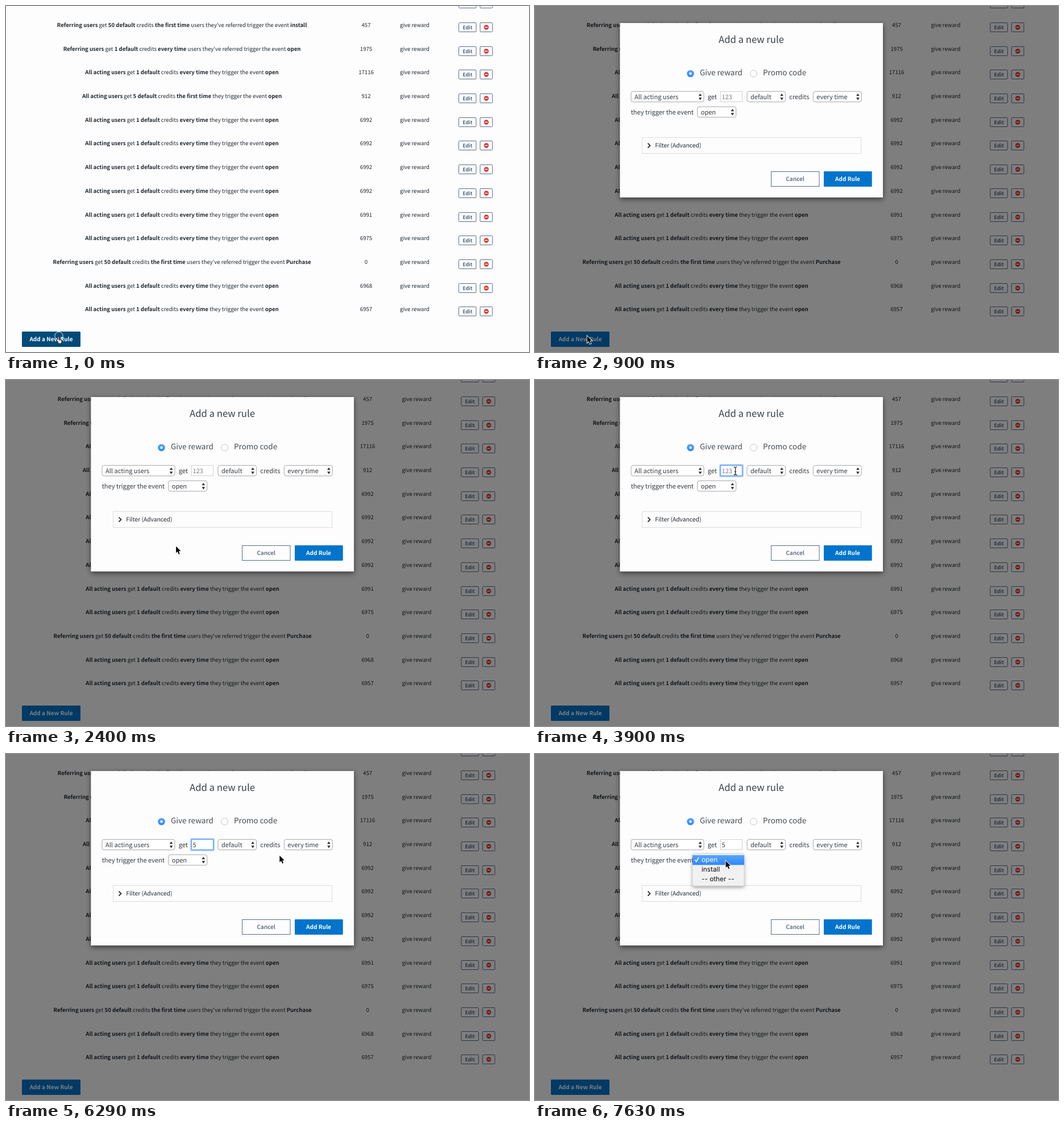
An HTML page for the animation above (8000 ms loop, 920x609 px).

```html
<!DOCTYPE html>
<html lang="en">
<head>
<meta charset="utf-8">
<title>Reward rules</title>
<style>
  html, body { margin: 0; width: 100%; height: 100%; overflow: hidden; background: #fdfdfd; }
  svg { display: block; width: 920px; height: 609px; }
  text {
    font-family: "Noto Sans CJK JP", "Noto Sans CJK SC", "Noto Sans CJK", "Open Sans", sans-serif;
    text-rendering: geometricPrecision; white-space: pre;
  }
  .b { font-weight: 700; }
  .mid { text-anchor: middle; }
  .cell { font-size: 9.6px; fill: #20272f; }
  .edit { font-size: 8.7px; fill: #53657f; }
  .form { font-size: 11.05px; fill: #343a41; }
  .radio { font-size: 13.5px; font-weight: 300; fill: #444a50; }
  .menu { font: 11.8px Inter, "Liberation Sans", sans-serif; fill: #111; }
  .outline { fill: #fdfdfd; stroke: #5a6c8a; }
</style>
</head>
<body>
<svg viewBox="0 0 920 609" xmlns="http://www.w3.org/2000/svg">
  <defs>
    <filter id="modalShadow" x="-10%" y="-10%" width="120%" height="125%">
      <feDropShadow dx="0" dy="3" stdDeviation="5" flood-opacity=".55"/>
    </filter>
    <filter id="menuShadow" x="-20%" y="-20%" width="140%" height="150%">
      <feDropShadow dx="0" dy="3" stdDeviation="3" flood-opacity=".35"/>
    </filter>
    <linearGradient id="blue" x2="0" y2="1">
      <stop stop-color="#56a5fb"/><stop offset="1" stop-color="#2f88f8"/>
    </linearGradient>
  </defs>
  <rect width="920" height="609" fill="#fdfdfd"/>
  <g id="table"></g>
  <rect id="addButton" x="28" y="573" width="103" height="27" rx="1.5"/>
  <text class="b mid" x="79.5" y="590" font-size="10.03" fill="#fff">Add a New Rule</text>

  <g id="dialog">
    <rect width="920" height="609" opacity=".5"/>
    <rect x="149.5" y="30" width="462.5" height="307" fill="#fdfdfd" filter="url(#modalShadow)"/>
    <text class="mid" x="380.5" y="65" font-size="16.7" fill="#3a4047">Add a new rule</text>
    <circle cx="273.5" cy="119" r="6.3" fill="url(#blue)"/>
    <circle cx="273.5" cy="119" r="2.2" fill="#fff"/>
    <text class="radio" x="290" y="122">Give reward</text>
    <circle cx="384.6" cy="119" r="6" fill="#fff" stroke="#c4c4c4"/>
    <text class="radio" x="401" y="122">Promo code</text>
    <g id="selects"></g>
    <text class="form" x="303.7" y="163.5">get</text>
    <text class="form" x="447.3" y="163.5">credits</text>
    <text class="form" x="168.7" y="190.5">they trigger the event</text>

    <rect x="326.5" y="150.5" width="38" height="18" fill="#fff" stroke="#d0d0d0"/>
    <g id="focus" fill="none">
      <rect x="325" y="149" width="41" height="21" rx="2" stroke="#a9cffa" stroke-width="2"/>
      <rect x="326.5" y="150.5" width="38" height="18" stroke="#5b9fee" stroke-width="1.2"/>
    </g>
    <text id="amount" x="328.6" y="163.5" font-size="10.9"></text>
    <rect id="caret" y="151.5" width="1" height="15.5" fill="#111"/>

    <rect x="188.5" y="231.5" width="385" height="28" fill="none" stroke="#dcdcdc"/>
    <path d="M198.5 241.7l4 4-4 4" fill="none" stroke="#222" stroke-width="1.7"/>
    <text x="211.3" y="249.3" font-size="10.3" fill="#20272f">Filter (Advanced)</text>

    <rect class="outline" x="415.5" y="291.5" width="84.5" height="26"/>
    <text class="b mid" x="457.6" y="308" font-size="10.03" fill="#68758a">Cancel</text>
    <rect x="508" y="291" width="84.7" height="27" rx="1" fill="#0074cc"/>
    <text class="b mid" x="550" y="308" font-size="10.03" fill="#fff">Add Rule</text>

    <g id="menu">
      <rect x="277" y="175.5" width="91" height="56.5" rx="3" fill="#f1f1f1" stroke="#b8b8b8" stroke-width=".5" filter="url(#menuShadow)"/>
      <rect x="277" y="178" width="91" height="17.3" fill="url(#blue)"/>
      <path d="M281.3 186.4l2.6 3.2 4-7.4" fill="none" stroke="#fff" stroke-width="1.5"/>
      <text class="menu" x="293" y="190" style="fill:#fff">open</text>
      <text class="menu" x="293" y="207">install</text>
      <text class="menu" x="293" y="223.5">-- other --</text>
    </g>
  </g>

  <circle id="ring" cx="93" cy="580.6" r="7.1" fill="none" stroke="#fff" stroke-width="1"/>
  <g id="pointer">
    <path id="arrow" d="M.3 .8V12.6L3 10 5 14.8 6.9 14 5 9.2H8.7Z" stroke="#fff" stroke-width="1.8" paint-order="stroke"/>
    <path id="beam" d="M-3-7Q0-7 0-5Q0-7 3-7M0-5.5V5.5M-3 7Q0 7 0 5Q0 7 3 7M-1.5 1.5H1.5" fill="none" stroke="#111" stroke-width="1.1"/>
    <path id="hand" d="M-1 8.3L-3 6Q-3.8 4.8-2.7 4.4T-.8 5.5V1.2Q-.8 0 .2 0T1.2 1.2V4.6L3 4.8 5 5.4 6 6.3V9Q5.5 10.5 5 12H.3Q0 10.2-1 8.3ZM1.2 4.6V7M3 4.8V7M4.8 5.4V7.4" fill="#fff" stroke="#111" stroke-width=".8" stroke-linejoin="round"/>
  </g>
</svg>
<script>
  const $ = id => document.getElementById(id);
  const LOOP = 8000, PITCH = 41.69;

  // Rule sentences: starred parts are bold.
  const acting = (n, when) => `*All acting users* get *${n} default* credits *${when}* they trigger the event *open*`;
  const referring = (n, when, event) =>
    `*Referring users* get *${n} default* credits *${when}* users they've referred trigger the event *${event}*`;
  const daily = count => [acting(1, 'every time'), count];
  const rules = [
    [referring(50, 'the first time', 'install'), 457],
    [referring(1, 'every time', 'open'), 1975],
    daily(17116),
    [acting(5, 'the first time'), 912],
    ...[6992, 6992, 6992, 6992, 6991, 6975].map(daily),
    [referring(50, 'the first time', 'Purchase'), 0],
    daily(6968), daily(6957)
  ];

  const sentence = s => s.split('*')
    .map((part, i) => i % 2 ? `<tspan class="b">${part}</tspan>` : part).join('');

  const rowY = row => Math.round(row * PITCH);

  const buttons = y => `
    <rect class="outline" x="796.5" y="${y - 8}" width="30.5" height="16" rx="1"/>
    <text class="edit b mid" x="811.8" y="${y + 3.4}">Edit</text>
    <rect class="outline" x="834" y="${y - 8}" width="21.7" height="16" rx="1"/>
    <circle cx="844.9" cy="${y}" r="4.2" fill="#d9322d"/>
    <rect x="842.3" y="${y - .8}" width="5.2" height="1.6" fill="#fff"/>`;

  const cell = (x, row, content) =>
    `<text class="cell mid" x="${x}" y="${37 + rowY(row)}">${content}</text>`;

  const columns = [
    rules.map(([s], i) => cell(309.5, i, sentence(s))),
    rules.map(([, n], i) => cell(633.5, i, n)),
    rules.map((_, i) => cell(719, i, 'give reward')),
    [-1, ...rules.keys()].map(i => buttons(37.5 + rowY(i)))
  ];
  $('table').innerHTML = columns.map(c => `<g>${c.join('')}</g>`).join('');

  const select = (x, y, w, label) => `
    <rect x="${x}" y="${y}" width="${w}" height="18.5" rx="3.5" fill="#fff" stroke="#a6a6a6"/>
    <text class="form" x="${x + 6}" y="${y + 13.2}">${label}</text>
    <path d="M${x + w - 9.3} ${y + 8}h5.8l-2.9-4.4zm0 3h5.8l-2.9 4.4z" fill="#333"/>`;
  $('selects').innerHTML =
    select(169, 150.3, 128, 'All acting users') + select(373, 150.3, 67.5, 'default') +
    select(489.3, 150.3, 85, 'every time') + select(285.7, 177.3, 68, 'open');

  // Pointer stops: time, x, y, shape.
  const stops = [
    [0, 92, 582, 'hand'], [750, 91.5, 580, 'arrow'],
    [1650, 93, 567], [1800, 104, 532], [1950, 130, 475], [2100, 185, 392],
    [2250, 252, 329], [2400, 298.8, 292], [2550, 335, 218], [2700, 342, 190],
    [2850, 351, 165, 'beam'], [3000, 352.5, 160, 'beam'], [5090, 359, 160, 'beam'],
    [5240, 385, 160], [5390, 425, 160], [5540, 465, 160], [5690, 500, 160.5],
    [5840, 516, 161], [6290, 481, 178], [6440, 432, 191], [6590, 388, 197],
    [6740, 357, 195], [6890, 340, 190], [7040, 335.3, 187.5]
  ];
  const caretFlips = [3450, 3900, 4350, 4940, 5540, 5990, 6590, 7040];
  const columnShift = [1, 2.6, 3.4, 4.3];

  const show = (id, on) => { $(id).style.display = on ? '' : 'none'; };

  function draw(t) {
    const open = t >= 900, typed = t >= 4500;
    [...$('table').children].forEach((g, i) =>
      g.setAttribute('transform', `translate(${open ? columnShift[i] : 0} 0)`));
    $('addButton').setAttribute('fill', open ? '#0074cc' : '#004b79');
    show('dialog', open);
    show('ring', !open);
    $('ring').style.opacity = t < 150 ? .85 : 1;

    show('focus', t >= 3300 && t < 7480);
    $('focus').style.opacity = t < 3450 ? .5 : 1;
    $('amount').textContent = typed ? '5' : '123';
    $('amount').setAttribute('fill', typed ? '#343a41' : '#7d7d7d');
    show('caret', caretFlips.filter(f => f <= t).length % 2);
    $('caret').setAttribute('x', typed ? 335 : 328);
    show('menu', t >= 7480);

    const [, x, y, shape = 'arrow'] = stops.filter(s => s[0] <= t).pop();
    $('pointer').setAttribute('transform', `translate(${x} ${y})`);
    for (const id of ['arrow', 'beam', 'hand']) show(id, id === shape);
  }

  const start = performance.now();
  function tick() {
    draw((performance.now() - start) % LOOP);
    requestAnimationFrame(tick);
  }
  tick();
</script>
</body>
</html>
```
